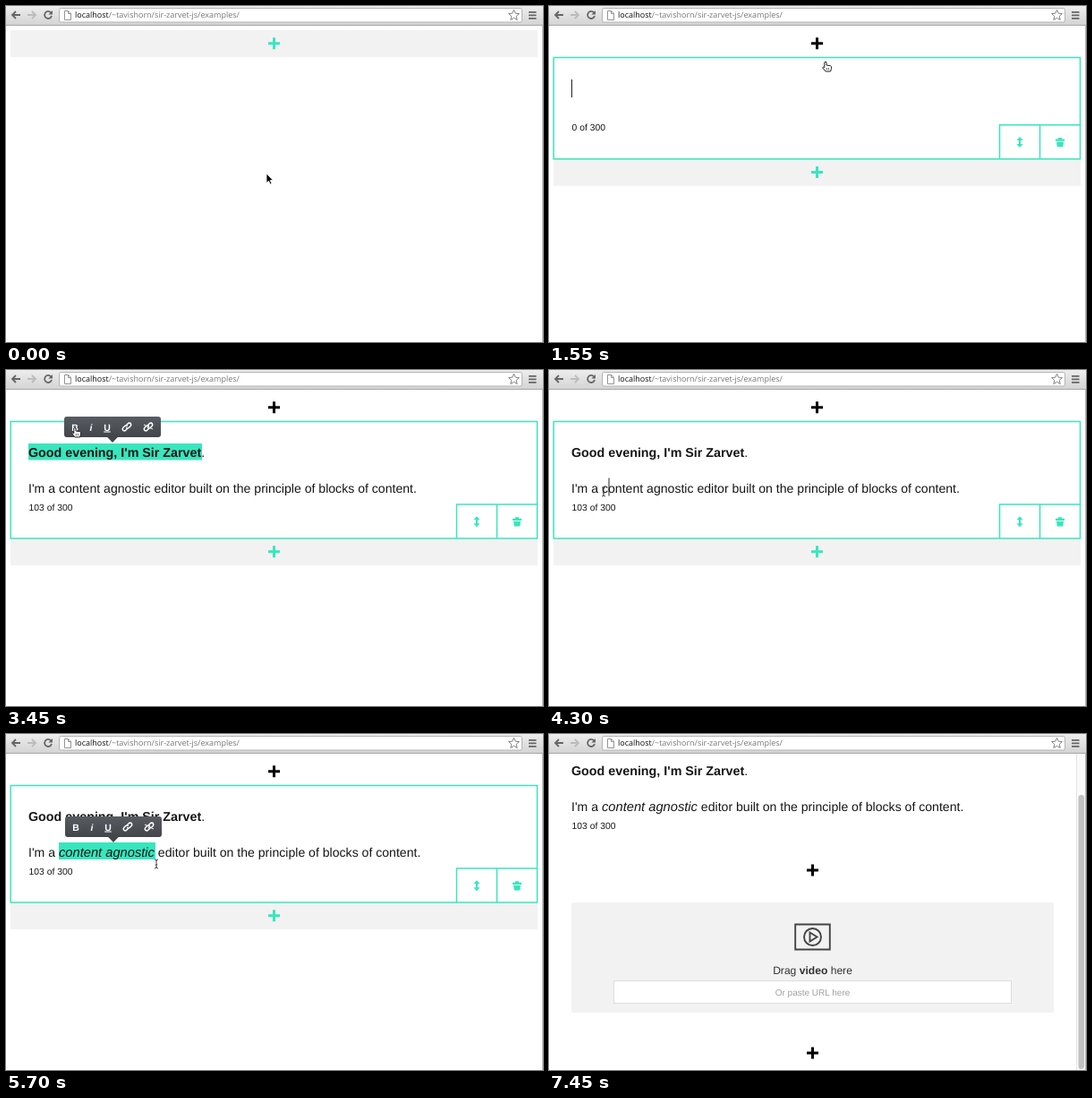
An HTML page that plays this animation: 600x375 px, repeating every 8000 ms.

```html
<!DOCTYPE html>
<html lang="en">
<head>
<meta charset="utf-8">
<title>Block editor demo</title>
<style>
  html, body { margin: 0; width: 100%; height: 100%; overflow: hidden; background: #fff; }
  svg { display: block; width: 600px; height: 375px; }
  text { font-family: "Liberation Sans", Arial, sans-serif; text-rendering: geometricPrecision; white-space: pre; }
  .url { font-family: "Open Sans", "Noto Sans", sans-serif; }
</style>
</head>
<body>
<svg viewBox="0 0 600 375" xmlns="http://www.w3.org/2000/svg">
  <defs>
    <linearGradient id="chrome" x2="0" y2="1"><stop stop-color="#ededed"/><stop offset="1" stop-color="#d4d4d4"/></linearGradient>
    <linearGradient id="dark" x2="0" y2="1"><stop stop-color="#585c62"/><stop offset="1" stop-color="#42464b"/></linearGradient>
    <clipPath id="view"><rect y="22" width="600" height="353"/></clipPath>
  </defs>
  <rect width="600" height="375" fill="#fff"/>
  <g id="page" clip-path="url(#view)"></g>
  <path d="M599.5 22V375" stroke="#b8b8b8"/>
  <g id="browser">
    <rect width="600" height="21" fill="url(#chrome)"/>
    <path d="M0 21.5H600" stroke="#a6a6a6"/>
    <rect x="59.5" y="2.5" width="517" height="15.5" rx="2" fill="#fff" stroke="#b3b3b3"/>
    <g fill="none" stroke="#666" stroke-width="1.8">
      <path d="M16 10H7.5M11 6L7 10L11 14"/>
      <path d="M24 10H32.5M29 6L33 10L29 14" stroke="#bcbcbc"/>
      <path d="M50.2 7.4A4 4 0 1 0 51 11"/>
      <path d="M584 6.8H592.5M584 10.3H592.5M584 13.8H592.5"/>
    </g>
    <path d="M52 5V9.6H47.4Z" fill="#666"/>
    <path d="M65.5 5.5H69.5L72.5 8.5V15.5H65.5ZM69.5 5.5V8.5H72.5" fill="#fff" stroke="#8a8a8a" stroke-width=".9"/>
    <path d="M567.5 4.3L569.2 8.2L573.4 8.6L570.2 11.4L571.2 15.5L567.5 13.3L563.8 15.5L564.8 11.4L561.6 8.6L565.8 8.2Z" fill="#fff" stroke="#777" stroke-width=".9"/>
    <text class="url" x="77" y="13.2" font-size="9" fill="#777"><tspan fill="#111">localhost</tspan>/~tavishorn/sir-zarvet-js/examples/</text>
  </g>
  <g id="cursor"></g>
</svg>
<script>
const LOOP = 8000, STEP = 50;
const GREEN = '#38e6bd', GREY = '#f2f2f2', INK = '#161616', ICON = '#555';
const page = document.getElementById('page');
const cursor = document.getElementById('cursor');

const greeting = "Good evening, I'm Sir Zarvet.";
const lead = "I'm a ", phrase = 'content agnostic';
const tail = ' editor built on the principle of blocks of content.';
const body = lead + phrase + tail;
const SIZE = 14.08, GREET = 13.7, BOLD = 14.3, SLANT = 14.7;

// When each action happens, in ms
const T = {
  open: 500, text: 1400, type: 1750, typed: 2450,
  select1: 2550, bar1: 3000, bold: 3450, clear1: 3850,
  caret: 4250, select2: 4350, bar2: 4800, italic: 5200, clear2: 5900,
  reopen: 6250, video: 6850, scroll: 6950, scrolled: 7350
};

const moves = [
  [0, 291, 187], [50, 291, 187], [450, 299, 40], [600, 299, 40], [1150, 309, 62],
  [1600, 309, 62], [2200, 28, 92], [2550, 28, 92], [2950, 204, 93],
  [3350, 77, 64], [3550, 77, 64], [4200, 61, 136], [4350, 61, 136],
  [4700, 167, 136], [5100, 96, 104], [5250, 96, 104], [5600, 168, 145],
  [5900, 168, 145], [6200, 299, 202], [6300, 299, 202], [6700, 427, 209], [7000, 427, 209]
];
const shapes = [
  [0, 'arrow'], [350, 'hand'], [1700, 'beam'], [3200, 'hand'], [3700, 'beam'],
  [5000, 'hand'], [5400, 'beam'], [6150, 'hand'], [7000, '']
];
const cursorArt = {
  arrow: '<path d="M0 0V10.5L2.5 8.3L4.2 12L5.9 11.2L4.2 7.6H7.4Z" fill="#000" stroke="#fff" stroke-width=".8"/>',
  hand: '<path d="M-1.2 .8Q0 -.5 1 .8V4L5.6 4.8Q7 5.3 6.6 7.2L5.6 11H0L-3.3 6.8Q-3 5.2 -1.2 6.6Z" fill="#fff" stroke="#222"/><path d="M1.3 7V9.4M3.4 7V9.4" stroke="#222" stroke-width=".7"/>',
  beam: '<path d="M-2 -5Q0 -5 0 -3.5Q0 -5 2 -5M0 -4V4M-2 5Q0 5 0 3.5Q0 5 2 5M-1.2 1H1.2" fill="none" stroke="#333" stroke-width=".9"/>'
};

const items = [
  ['Quote', 167, '<path d="M-1.5 -8Q-10.5 -6 -10.5 2V8H-2.5V0H-7Q-7 -4 -1.5 -5ZM10 -8Q1 -6 1 2V8H9V0H4.5Q4.5 -4 10 -5Z"/>'],
  ['Heading', 215, '<path d="M-10 -9H-2V-7H-4V-1.5H4V-7H2V-9H10V-7H8V7H10V9H2V7H4V1.5H-4V7H-2V9H-10V7H-8V-7H-10Z"/>'],
  ['Image', 262.5, '<path d="M-12.5 -9H12.5V9H-12.5ZM-10 5L-5 -1L0 4L5 -3L10 5"/><circle cx="6" cy="-5" r="1.6"/>'],
  ['Text', 303, '<path d="M-10 10L-8 3L5 -10L10 -5L-3 8ZM-8 3L-3 8M2 -7L7 -2M4 -4L-5 5"/>'],
  ['Status', 343, '<circle r="9" fill="currentColor"/>'],
  ['List', 383, [-6.5, 0, 6.5].map((y, i) =>
    `<path d="M-12.5 ${y - 1.5}H-9.5V${y + 1.5}H-12.5ZM-6 ${y - 1.5}H${[7, 13, 9][i]}V${y + 1.5}H-6Z"/>`).join('')],
  ['Video', 422, '<path d="M-12.5 -9H12.5V9H-12.5ZM-2 -3L3.2 0L-2 3Z"/><circle r="6"/>']
];

const ctx = document.createElement('canvas').getContext('2d');
function measure(str, size) {
  ctx.font = '100px "Liberation Sans", Arial, sans-serif';
  return ctx.measureText(str).width * size / 100;
}

const clamp = v => Math.max(0, Math.min(1, v));
const progress = (t, a, b) => clamp((t - a) / (b - a));
const ease = p => p * p * (3 - 2 * p);
const within = (t, a, b) => t >= a && t < b;
const at = (x, y, s) => `<g transform="translate(${x} ${y})">${s}</g>`;
const rect = (x, y, w, h, fill, extra = '') =>
  `<rect x="${x}" y="${y}" width="${w}" height="${h}" fill="${fill}" ${extra}/>`;
const text = (x, y, size, s, extra = '') =>
  `<text x="${x}" y="${y}" font-size="${size}" fill="${INK}" ${extra}>${s}</text>`;
const plus = (x, y, color) =>
  `<path d="M${x - 6.5} ${y}H${x + 6.5}M${x} ${y - 6.5}V${y + 6.5}" stroke="${color}" stroke-width="3"/>`;
const caret = (x, y) => `<path d="M${x} ${y - 10}V${y + 10}" stroke="#222"/>`;

function pointer(t) {
  let i = 0;
  while (i < moves.length - 2 && t >= moves[i + 1][0]) i++;
  const [a, x, y] = moves[i], [b, u, v] = moves[i + 1];
  const p = ease(progress(t, a, b));
  return { x: x + (u - x) * p, y: y + (v - y) * p };
}

const addBar = y => rect(5, y, 589, 30, GREY, 'rx="1"') + plus(299.5, y + 14.7, GREEN);

function picker(y, mouse) {
  return rect(5, y, 589, 76, GREY, 'rx="1"') + items.map(([name, x, art]) => {
    const over = mouse.y > y && mouse.y < y + 76 && Math.abs(mouse.x - x) < 17;
    const color = over ? GREEN : ICON;
    return `<g color="${color}">` +
      at(x, y + 25.2, `<g fill="none" stroke="currentColor" stroke-width="1.4">${art}</g>`) +
      text(x, y + 60.2, 11.3, name, `text-anchor="middle" style="fill:${color}"`) + '</g>';
  }).join('');
}

function frame(bottom) {
  const top = bottom - 38;
  return `<path d="M5.2 57.5H593.5V${bottom}H5.2ZM503.5 ${bottom}V${top}H593.5M548.5 ${top}V${bottom}" fill="none" stroke="${GREEN}" stroke-width="1.5"/>` +
    at(526, bottom - 18.7, `<path d="M0 -6L3.6 -2H1V2H3.6L0 6L-3.6 2H-1V-2H-3.6Z" fill="${GREEN}"/>`) +
    at(571, bottom - 18.7, `<path d="M-5 -3.5H-2V-5H2V-3.5H5V-1.3H-5ZM-4 -.5H4L3.3 5.2H-3.3Z" fill="${GREEN}"/>`);
}

function formatBar(x, y) {
  const link = '<path d="M-1 -1.5L1.5 -4Q3.5 -5 4.5 -3.3Q5.3 -2 4 -.7L2 1.2Q.5 2 -.8 .8M1 1.5L-1.5 4Q-3.5 5 -4.5 3.3Q-5.3 2 -4 .7L-2 -1.2Q-.5 -2 .8 -.8" fill="none" stroke="#fff" stroke-width="1.5"/>';
  const glyph = (dx, s, style) =>
    `<text x="${dx}" y="4" font-size="10.5" text-anchor="middle" fill="#fff" font-weight="700" ${style}>${s}</text>`;
  return at(x, y, rect(-54, -11.5, 108, 23, 'url(#dark)', 'rx="3"') +
    '<path d="M-6 11.3H6L0 17.5Z" fill="#42464b"/>' +
    glyph(-42, 'B', '') + glyph(-24, 'i', 'font-style="italic"') + glyph(-6, 'U', 'text-decoration="underline"') +
    at(16, 0, link) + at(40, 0, link + '<path d="M-5 -2.5L5 2.5" stroke="#fff"/>'));
}

function selection(t) {
  const marked = (s, size, a, b) => measure(s.slice(0, Math.max(1, Math.round(s.length * progress(t, a, b)))), size);
  if (within(t, T.select1, T.clear1)) {
    const w = t < T.bold ? marked(greeting, GREET, T.select1 - 20, 2950) : 194;
    return rect(25, 82, w, 18.5, GREEN);
  }
  if (within(t, T.select2, T.clear2)) {
    const w = t < T.italic ? marked(phrase, SIZE, T.select2, 4700) : 108;
    return rect(59, 121, w, 19, GREEN);
  }
  return '';
}

function copy(t) {
  const total = greeting.length + body.length;
  const count = Math.round(total * progress(t, T.type, T.typed));
  const first = greeting.slice(0, count), second = body.slice(0, Math.max(0, count - greeting.length));
  let out = selection(t);
  out += t < T.bold
    ? text(25, 97, GREET, first)
    : text(25, 97, BOLD, `<tspan font-weight="700">${greeting.slice(0, -1)}</tspan><tspan font-size="${SIZE}">.</tspan>`);
  out += t < T.italic
    ? text(25, 137, SIZE, second)
    : text(25, 137, SIZE, `${lead}<tspan font-style="italic" font-size="${SLANT}">${phrase}</tspan>${tail}`);
  out += text(25.5, second ? 156.5 : 138.7, 10.35, `${Math.round(103 * count / total)} of 300`);
  if (t < T.select1) {
    out += second ? caret(25.5 + measure(second, SIZE), 131) : caret(25.5 + measure(first, GREET), 92);
  }
  if (within(t, T.caret, T.select2)) out += caret(67, 130.5);
  return { out, bottom: second ? 188 : 170.7 };
}

function videoBlock() {
  const icon = '<path d="M-19.3 -14H19.3V14H-19.3ZM-3 -5L5 0L-3 5Z"/><circle r="9.5"/>';
  return plus(294.5, 203, '#000') + rect(25, 239, 539, 123, GREY, 'rx="2"') +
    at(294.5, 277.5, `<g fill="none" stroke="#444" stroke-width="1.9">${icon}</g>`) +
    text(294.5, 318.5, 12.1, 'Drag <tspan font-weight="700">video</tspan> here', 'text-anchor="middle" style="fill:#333"') +
    rect(72.5, 326.5, 444, 25, '#fff', 'stroke="#ddd"') +
    text(294.5, 342.7, 10, 'Or paste URL here', 'text-anchor="middle" style="fill:#a0a0a0"') +
    plus(294.5, 407, '#000');
}

function scene(t, mouse) {
  if (t < T.open) return addBar(27);
  if (t < T.text) return picker(27, mouse);
  const { out, bottom } = copy(t);
  if (t >= T.video) {
    const y = 51 * ease(progress(t, T.scroll, T.scrolled));
    return at(0, -y, plus(294.5, 41.7, '#000') + out + videoBlock()) +
      rect(590, 22, 9, 353, '#fafafa') + '<path d="M589.5 22V375" stroke="#e4e4e4"/>' +
      rect(591.5, 24 + y * 44 / 51, 6.5, 306, '#c1c1c1', 'rx="3.2"');
  }
  let s = plus(299.5, 41.7, '#000') + out;
  s += t < T.reopen ? addBar(bottom) + frame(bottom) : picker(189, mouse);
  if (within(t, T.bar1, T.clear1)) s += formatBar(119, 63.5);
  if (within(t, T.bar2, T.clear2)) s += formatBar(120, 103.5);
  return s;
}

function render(t) {
  const mouse = pointer(t);
  const shape = shapes.filter(([start]) => t >= start).pop()[1];
  page.innerHTML = scene(t, mouse);
  cursor.innerHTML = shape ? at(mouse.x, mouse.y, cursorArt[shape]) : '';
}

let last = -1;
const start = performance.now();
function tick() {
  const t = Math.floor((performance.now() - start) % LOOP / STEP) * STEP;
  if (t !== last) render(last = t);
  requestAnimationFrame(tick);
}
tick();
</script>
</body>
</html>
```
